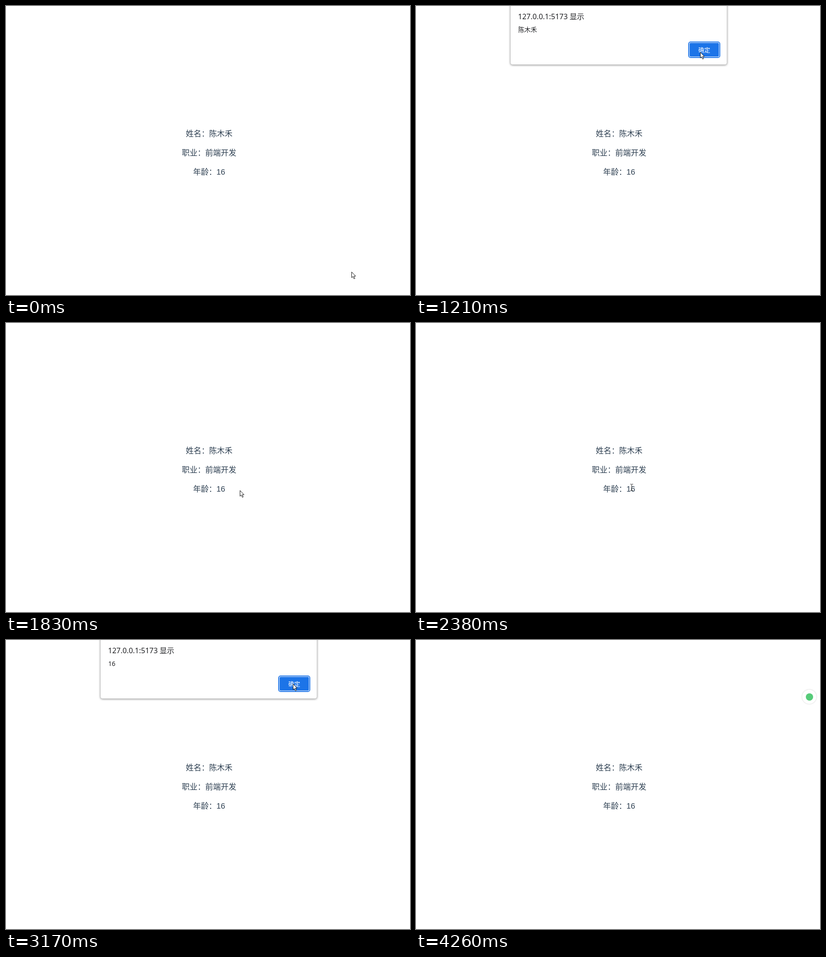
Recreate the animation shown at these times as an HTML page. Size 883 by 634 pixels, loop 4.49 s.

```html
<!DOCTYPE html>
<html lang="zh-CN">
<head>
<meta charset="utf-8">
<title>Alert demo</title>
<style>
  html, body { margin: 0; width: 100%; height: 100%; overflow: hidden; background: #fff; }
  #stage { position: relative; width: 883px; height: 634px; overflow: hidden; }
  #stage div, #stage svg { position: absolute; }
  .line {
    left: 344px; width: 200px; text-align: center; white-space: nowrap; color: #2c3e50;
    font: 300 17px/24px "Liberation Sans", "Noto Sans CJK SC", "Noto Sans CJK", sans-serif;
  }
  #dialog {
    left: 206px; top: -20px; width: 474px; height: 149px; box-sizing: border-box;
    background: #fff; border: solid #d2d2d2; border-width: 0 1px 1px; border-radius: 5px;
    box-shadow: 0 1px 4px rgba(0, 0, 0, .42); transform-origin: 50% 20px;
    color: #202124; white-space: nowrap;
    font-family: "Noto Sans", "Noto Sans CJK SC", "Noto Sans CJK", sans-serif;
  }
  #title { left: 16px; top: 31px; font-size: 16px; line-height: 24px; }
  #message { left: 16.5px; top: 63px; font-size: 13.6px; line-height: 17px; }
  #button {
    left: 389px; top: 99px; width: 68px; height: 34px; border-radius: 4px;
    background: #1c74e8; color: #fff; font-size: 13px; line-height: 34px; text-align: center;
  }
  #button.focus { box-shadow: inset 0 0 0 1px #1c74e8, inset 0 0 0 2px #fff, 0 0 0 1px #1c74e8; }
  #badge {
    left: 844px; top: 109px; width: 31px; height: 31px; border-radius: 50%;
    background: #fff; box-shadow: 0 0 3px rgba(0, 0, 0, .22);
  }
  #badge div { left: 8px; top: 8px; width: 16px; height: 16px; border-radius: 50%; background: #56cb79; }
  #arrow { left: 0; top: 0; }
  #beam { left: -4px; top: -8px; }
</style>
</head>
<body>
<div id="stage">
  <div class="line" style="top:269px">姓名：陈木禾</div>
  <div class="line" style="top:311px">职业：前端开发</div>
  <div class="line" style="top:353px">年龄：16</div>
  <div id="dialog">
    <div id="title">127.0.0.1:5173 显示</div>
    <div id="message"></div>
    <div id="button">确定</div>
  </div>
  <div id="badge"><div></div></div>
  <svg id="arrow" width="11" height="17">
    <path d="M.5 .5V13L3.3 10.4L5.5 15.5L7.6 14.6L5.4 9.7H9.3Z" fill="#fff" stroke="#111"/>
  </svg>
  <svg id="beam" width="8" height="16">
    <path d="M.5 .5H3M4 .5H6.5M3.5 1V14M.5 14.5H3M4 14.5H6.5" fill="none" stroke="#222"/>
  </svg>
</div>
<script>
const LOOP = 4490, TICK = 78, OFFSET = 38;  // the screen updates once per tick
const el = id => document.getElementById(id);
const show = (node, on) => { node.style.visibility = on ? 'visible' : 'hidden'; };
const clamp = v => Math.min(1, Math.max(0, v));
const easeOut = p => 1 - (1 - p) ** 2.5;

// Times are in ticks.
const alerts = [
  { open: 8, close: 17, text: '陈木禾' },
  { open: 33, close: 46, text: '16' }
];
const start = { x: 755, y: 583 };
const moves = [
  { from: -1, to: 5, x: 464, y: 280 },
  { from: 10, to: 15, x: 621, y: 101 },
  { from: 16, to: 17, x: 624, y: 100 },
  { from: 20, to: 24, x: 487, y: 424 },
  { from: 25, to: 30, x: 472, y: 361 },
  { from: 35, to: 40, x: 627, y: 96 },
  { from: 49, to: 53, x: 858, y: 618 }
];

function drawDialog(k) {
  const alert = alerts.find(a => k >= a.open && k < a.close + 5);
  show(el('dialog'), alert);
  if (!alert) return;
  const entering = (1 - clamp((k - alert.open) / 2)) ** 2;
  const leaving = clamp((k - alert.close - 2) / 3);
  const lift = 11.5 * entering + 15 * leaving;
  const { style } = el('dialog');
  style.opacity = 1 - .47 * entering - leaving ** 3;
  style.transform = lift
    ? `translateY(${-lift}px) perspective(1000px) rotateX(${lift * .22}deg)`
    : 'none';
  el('message').textContent = alert.text;
  el('button').className = k <= alert.close ? 'focus' : '';
}

// The three lines are 42px apart.
const overText = ({ x, y }) =>
  Math.abs(x - 444) < 60 && y > 259 && y < 385 && Math.abs((y - 259) % 42 - 21) < 12;

function drawPointer(k) {
  const pos = { ...start };
  for (const m of moves) {
    const p = easeOut(clamp((k - m.from) / (m.to - m.from)));
    pos.x += (m.x - pos.x) * p;
    pos.y += (m.y - pos.y) * p;
  }
  const onText = overText(pos), visible = k < 54;
  show(el('arrow'), visible && !onText);
  show(el('beam'), visible && onText);
  el(onText ? 'beam' : 'arrow').style.transform =
    `translate(${Math.round(pos.x)}px, ${Math.round(pos.y)}px)`;
}

function drawBadge(k) {
  show(el('badge'), k >= 50);
  el('badge').style.transform = `translateX(${Math.max(0, 52 - k) * 10}px)`;
}

function frame() {
  const k = Math.floor((performance.now() % LOOP - OFFSET) / TICK);
  drawDialog(k);
  drawPointer(k);
  drawBadge(k);
  requestAnimationFrame(frame);
}
frame();
</script>
</body>
</html>
```
